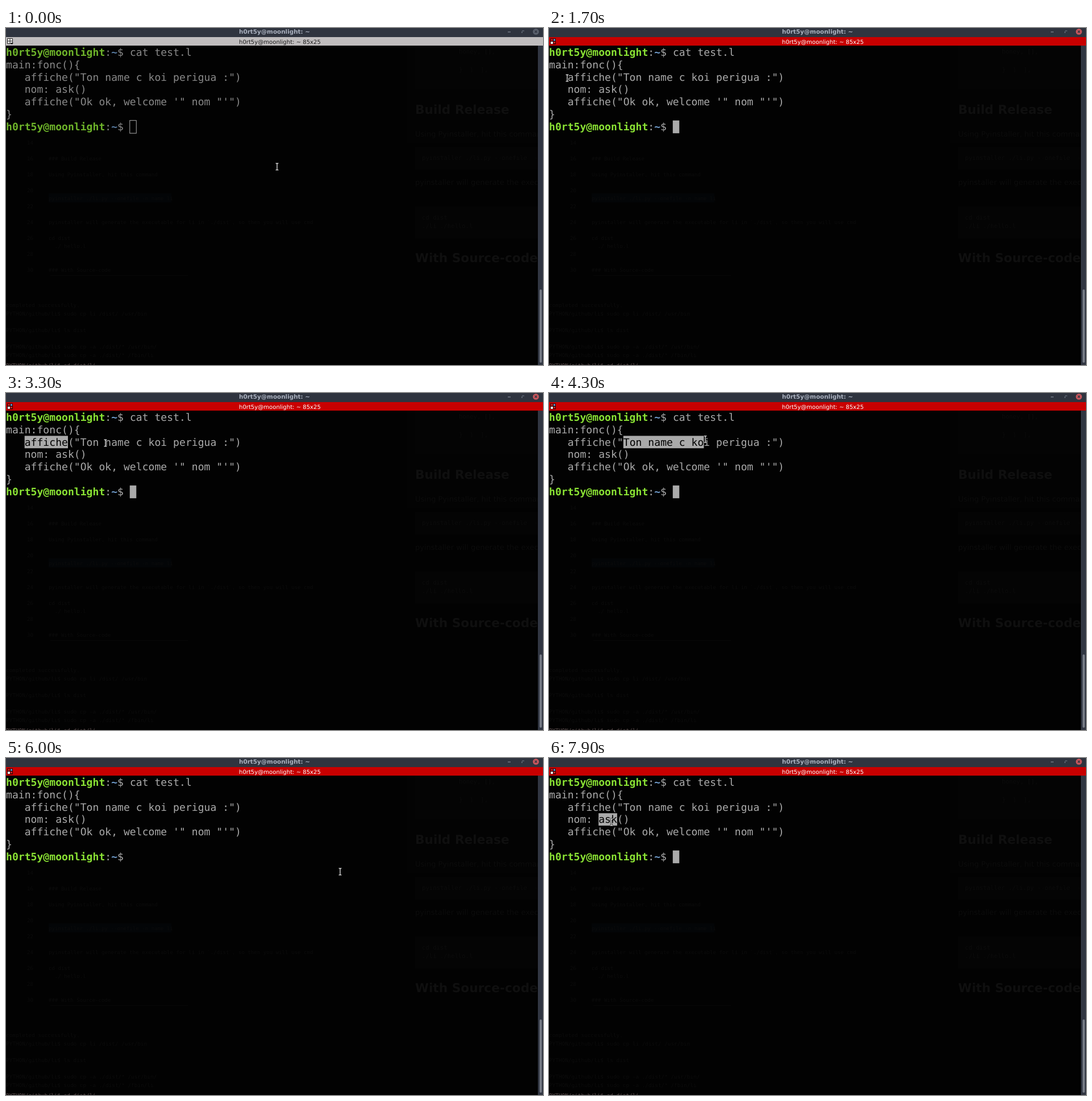
Write an HTML page that moves like this. It is 945 px wide and 593 px high and loops after 8 s.

```html
<!DOCTYPE html>
<html lang="en">
<head>
<meta charset="utf-8">
<title>Terminal</title>
<style>
html, body { margin: 0; width: 100%; height: 100%; overflow: hidden; background: #020202; }
svg { display: block; width: 945px; height: 593px; --fg: #888; --user: #6eb42a; --path: #5b7fa5; --bar: #c0bdbe; --label: #1c1c1c; --close: #5b616d; }
svg.focus { --fg: #aaa; --user: #8ae234; --path: #729fcf; --bar: #c80000; --label: #fff; --close: #cc575d; }
text { white-space: pre; text-rendering: geometricPrecision; }
.mono { font: 18.1px "DejaVu Sans Mono", monospace; fill: var(--fg); }
.mono .user { font-weight: bold; fill: var(--user); }
.mono .path { font-weight: bold; fill: var(--path); }
.title { font: bold 10.4px "DejaVu Sans", sans-serif; fill: #aab1bf; }
.label { font: 10.07px "DejaVu Sans", sans-serif; fill: var(--label); }
.ghost text { font-family: "DejaVu Sans Mono", monospace; fill: #0c0c0c; }
.ghost .prose { font-family: "DejaVu Sans", sans-serif; }
.ghost .head { font-family: "DejaVu Sans", sans-serif; font-weight: bold; fill: #0f0f0f; }
.ghost .edge { fill: #5c4d4d; }
#caret { fill: none; stroke: #aaa; }
.focus #caret { fill: #aaa; stroke: none; }
.live, .focus .idle { display: none; }
.focus .live { display: inline; }
#sel rect { fill: #aaa; }
#sel text { fill: #000; }
</style>
</head>
<body>
<svg id="stage" viewBox="0 0 945 593">
  <defs>
    <clipPath id="page"><rect y="31" width="936" height="562"/></clipPath>
    <path id="beam" d="M-2.4-5.8h1.6L0-5 .8-5.8h1.6M0-5v10M-2.4 5.8h1.6L0 5 .8 5.8h1.6" fill="none"/>
  </defs>
  <rect width="945" height="593" fill="#020202"/>
  <g id="ghost" class="ghost" clip-path="url(#page)">
    <path d="M706 31h231v172h-231z" fill="#030303"/>
    <path d="M720 31h217v76h-217zM720 209h217v40h-217zM720 314h217v56h-217z" fill="#040404"/>
    <path d="M75 291h216v16h-216z" fill="#030507"/>
    <path d="M78 435h242v1h-242z" fill="#080808"/>
  </g>

  <rect width="945" height="16" fill="#2f343f"/>
  <text class="title" x="410" y="10">h0rt5y@moonlight: ~</text>
  <path d="M883 7h5" stroke="#8f96a3"/>
  <path d="M908 8v-2M910 5h-2M907 8h2M911 4v2" stroke="#737a87" fill="none"/>
  <circle cx="932.5" cy="6.5" r="5.3" fill="var(--close)"/>
  <path d="M930.5 4.5l4 4m0-4l-4 4" stroke="#2f343f" stroke-width="1.3"/>

  <rect y="16" width="945" height="15" fill="var(--bar)"/>
  <text class="label" x="410" y="27.5">h0rt5y@moonlight: ~ 85x25</text>
  <g class="idle">
    <path d="M2.5 18.5h9v9h-9zM7 18.5v9M2.5 23h9" fill="#eee" stroke="#222"/>
    <path d="M8 26h5l-2.5 3z" fill="#111"/>
  </g>
  <g class="live">
    <path d="M2 18.5h10v10h-10z" fill="#2b0000"/>
    <path d="M3 24h4v4h-4z" fill="#eee"/>
    <path d="M8 19.5h3v3h-3z" fill="#5b9bd8"/>
    <path d="M3 19.5h4v3h-4zM8 24h3v3h-3z" fill="#c22"/>
  </g>

  <rect x="936" y="31" width="9" height="562" fill="#313642"/>
  <rect x="939" y="460" width="4" height="129" rx="2" fill="#767b86"/>

  <g id="rows" class="mono"></g>
  <rect id="caret" x="217.8" y="162.7" width="11.5" height="22.5"/>
  <g id="sel" class="mono"><rect height="21.8"/><text></text></g>
  <g id="mouse">
    <use href="#beam" stroke="#000" stroke-width="2.8"/>
    <use href="#beam" stroke="#e8e8e8" stroke-width="1.3"/>
  </g>
</svg>
<script>
const $ = id => document.getElementById(id);
const CELL = 10.9, ROW = 21.8, TOP = 31.8, BASE = 17.2;
const LOOP = 8000, STEP = 100, FOCUS = 500;
const BLINK = 611, BLINK_START = 450;

const prompt = '<tspan class="user">h0rt5y@moonlight</tspan>:<tspan class="path">~</tspan>$ ';
const lines = [
  prompt + 'cat test.l',
  'main:fonc(){',
  '   affiche("Ton name c koi perigua :")',
  '   nom: ask()',
  '   affiche("Ok ok, welcome \'" nom "\'")',
  '}',
  prompt
];

// One text element per line, evenly spaced from the first baseline
function block(parent, x, y, step, size, cls, rows) {
  parent.insertAdjacentHTML('beforeend', rows.map((s, i) =>
    `<text class="${cls}" x="${x}" y="${y + i * step}" font-size="${size}">${s}</text>`).join(''));
}

rowsText: for (const [i, s] of lines.entries())
  $('rows').insertAdjacentHTML('beforeend', `<text y="${TOP + i * ROW + BASE}">${s}</text>`);

// Windows showing faintly through the terminal
const ghost = (...args) => block($('ghost'), ...args);
ghost(797, 45, 16, 10.6, 'code', ['honey, [],', '', '}  )  ],']);
ghost(720, 151, 261, 21.7, 'head', ['Build Release', 'With Source-code']);
ghost(720, 191, 85, 13, 'prose', [
  'Using Pyinstaller, hit this command:',
  'pyinstaller will generate the executable'
]);
ghost(732, 232, 15, 10.6, 'code', [
  'pyinstaller ./li.py --onefile  -n li', '', '', '', '', '', '',
  'cd dist',
  './li ./hello.l'
]);
ghost(37, 205, 28, 9.1, 'code', Array.from({ length: 9 }, (_, i) => 14 + 2 * i));
ghost(75, 233, 14, 9.1, 'code', [
  '### Build Release', '',
  'Using Pyinstaller, hit this command', '', '',
  'pyinstaller ./li.py --onefile -n name li', '', '',
  'pyinstaller will generate the executable for li in `./dist`, so then you will use cmd', '',
  'cd dist',
  '  ./ hello.l', '', '',
  '### With Source-code'
]);
ghost(0, 491, 14.65, 9.4, 'code', [
  'completed successfully.',
  'PYTHON/github/li$ sudo cp li /dist/ /usr/bin', '',
  'PYTHON/github/li$ ls dist', '',
  'PYTHON/github/li$ sudo cp -a ./dist/* /usr/bin/',
  'PYTHON/github/li$ sudo cp -a ./dist/* /fbin/li'
]);
ghost(0, 597, 0, 9.4, 'edge', ['PYTHON/github/li$ cd dist/li']);

// Pointer moves: start, end, then the place reached
const home = [477, 244];
const moves = [
  [0, 200, 441, 226],
  [600, 1700, 32, 88],
  [1900, 2400, 105, 87],
  [3200, 3300, 175, 88],
  [3300, 3800, 130, 83],
  [3900, 5300, 392, 80],
  [5300, 5700, 588, 200],
  [6000, 6800, 102, 106],
  [7100, 7500, 110, 113]
];
const picks = [
  { from: 2000, to: 3400, row: 2, text: 'affiche' },
  { from: 4000, to: 6000, row: 2, text: 'Ton name c koi perigua :' },
  { from: 7000, to: LOOP, row: 3, text: 'ask', whole: true }
];

const easeOut = k => 1 - (1 - k) ** 2.4;

function pointer(t) {
  let [x, y] = home;
  for (const [start, end, toX, toY] of moves) {
    if (t <= start) break;
    const k = easeOut(Math.min(1, (t - start) / (end - start)));
    x += (toX - x) * k;
    y += (toY - y) * k;
  }
  return [x, y];
}

function caretOn(t) {
  return t < FOCUS || Math.floor((t - BLINK_START) / BLINK) % 2 === 0;
}

function set(el, attrs) {
  for (const k in attrs) el.setAttribute(k, attrs[k]);
}

function drawSelection(t, mouseX) {
  const pick = picks.find(p => t >= p.from && t < p.to);
  const [rect, text] = $('sel').children;
  let count = 0;
  if (pick) {
    const { row, text: word, whole } = pick;
    const col = lines[row].indexOf(word);
    const dragged = Math.round(mouseX / CELL) - col;
    count = whole ? word.length : Math.max(0, Math.min(word.length, dragged));
    const x = col * CELL, y = TOP + row * ROW;
    set(rect, { x, y, width: count * CELL });
    set(text, { x, y: y + BASE });
    text.textContent = word.slice(0, count);
  }
  set($('sel'), { visibility: count ? 'visible' : 'hidden' });
}

function draw(t) {
  const [x, y] = pointer(t);
  $('stage').classList.toggle('focus', t >= FOCUS);
  set($('caret'), { visibility: caretOn(t) ? 'visible' : 'hidden' });
  set($('mouse'), { transform: `translate(${x} ${y})` });
  drawSelection(t, x);
}

const begin = performance.now();
function tick() {
  const t = (performance.now() - begin) % LOOP;
  draw(Math.floor(t / STEP) * STEP);
  requestAnimationFrame(tick);
}
tick();
</script>
</body>
</html>
```
